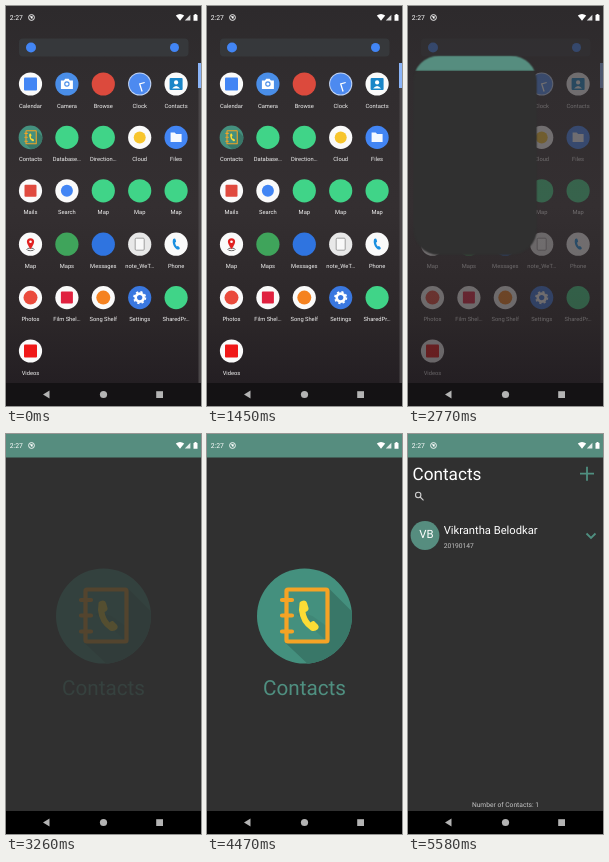
An HTML page for the animation above (6.46 s loop, 195 by 400 pixels).

```html
<!DOCTYPE html>
<html lang="en">
<head>
<meta charset="utf-8">
<title>Contacts app launch</title>
<style>
  html, body { margin: 0; width: 100%; height: 100%; overflow: hidden; background: #000; }
  #stage { position: relative; width: 195px; height: 400px; overflow: hidden; }
  #stage > div, #stage > svg, .layer > svg { position: absolute; left: 0; top: 0; width: 195px; height: 400px; }
  #home { background: linear-gradient(#2d2a2c, #312d2f 20%, #342f31 50%, #2c2729 78%, #241f23 94%); }
  #splash { transform-origin: 0 0; }
  text { font-family: Roboto, sans-serif; text-rendering: geometricPrecision; }
  .label { font-size: 5.75px; fill: #f2f2f2; text-anchor: middle; }
</style>
</head>
<body>
<div id="stage">
  <div id="home" class="layer">
    <svg viewBox="0 0 195 400">
      <rect y="377" width="195" height="23" fill="#141214"/>
      <g id="drawer">
        <rect x="13" y="32.5" width="169.500" height="18" rx="4" fill="#36383b"/>
        <circle cx="25" cy="41.5" r="5" fill="#4285f4"/>
        <circle cx="168.500" cy="41.5" r="4.500" fill="#4285f4"/>
        <rect x="192.500" y="57" width="2.500" height="320" fill="#4a4648"/>
        <rect x="192" y="57" width="3" height="25" fill="#8ab4f8"/>
      </g>
    </svg>
  </div>

  <div id="splash" class="layer">
    <svg viewBox="0 0 195 400">
      <rect width="195" height="400" fill="#303030"/>
      <rect width="195" height="23.5" fill="#568d7f"/>
      <rect y="377" width="195" height="23"/>
      <g id="brand">
        <use href="#book" x="97.5" y="182"/>
        <text x="97.5" y="260.5" font-size="20.7" text-anchor="middle" fill="#4f8f80">Contacts</text>
      </g>
    </svg>
  </div>

  <div id="list" class="layer">
    <svg viewBox="0 0 195 400">
      <rect width="195" height="400" fill="#303030"/>
      <rect width="195" height="23.5" fill="#568d7f"/>
      <rect y="377" width="195" height="23"/>
      <text x="4.5" y="46.3" font-size="17.2" fill="#fff">Contacts</text>
      <g fill="none" stroke="#4f8f80" stroke-width="1.8">
        <path d="M172 39.700h14M179 32.700v14"/>
        <path d="M178.500 99.500l4.500 4.500 4.500-4.500"/>
      </g>
      <g fill="none" stroke="#d0d0d0" stroke-width="1.1">
        <circle cx="10.200" cy="61" r="2.700"/>
        <path d="M12.200 63l3.300 3.300"/>
      </g>
      <circle cx="17" cy="101.500" r="14.400" fill="#568d7f"/>
      <text x="18.5" y="104.3" font-size="11.4" text-anchor="middle" fill="#fff">VB</text>
      <text x="35.7" y="99.6" font-size="11.2" fill="#fff">Vikrantha Belodkar</text>
      <text x="35.8" y="114.300" font-size="6.7" fill="#c4c4c4">20190147</text>
      <text x="97.5" y="373" font-size="6.7" text-anchor="middle" fill="#c4c4c4">Number of Contacts: 1</text>
    </svg>
  </div>

  <svg id="system" viewBox="0 0 195 400">
    <defs>
      <clipPath id="disc"><circle r="47.5"/></clipPath>
      <path id="handset" d="M-9-12Q-9.500-15-4.500-15.500Q-2-15.500-1.500-13L0-8Q.5-5.500-3-4Q-2 2 2 6.500Q3.500 4.500 5.500 5L9.500 9Q11 11 9.500 13Q6.500 16 2.500 14.500Q-8.500 7-9.500-6Z"/>
      <g id="book">
        <circle r="47.500" fill="#44907e"/>
        <path clip-path="url(#disc)" d="M24-28L64 12V60H16L-20 26L22 24Z" fill="#397768"/>
        <path clip-path="url(#disc)" d="M-4-4L-8-2L22 25V10L8 0Z" fill="#3d8070" opacity=".5"/>
        <g fill="none" stroke="#f5a325" stroke-width="4.200">
          <rect x="-18" y="-26.500" width="41" height="52" rx="1.500"/>
          <path d="M-22.500-16h10M-22.500-.5h10M-22.500 15.500h10" stroke-linecap="round"/>
        </g>
        <use href="#handset" x="4" fill="#fcdc35"/>
      </g>
    </defs>
    <g fill="#fff">
      <text x="3.700" y="13.7" font-size="6.8">2:27</text>
      <circle cx="25.500" cy="11.500" r="2.900" fill="none" stroke="#fff" stroke-width=".9"/>
      <path d="M24 10l3 .4-.8 2.600-1.200-.8z"/>
      <path d="M169.800 9.500Q174 6.300 178.200 9.500L174 14.800Z"/>
      <path d="M178.800 14.600h5.600V8.800z" opacity=".85"/>
      <path d="M187.500 9h1v-.9h2V9h1v5.700h-4z"/>
    </g>
    <g fill="#b4b4b4">
      <path d="M37 388.500l6.500-3.900v7.800z"/>
      <circle cx="97.500" cy="388.500" r="3.600"/>
      <rect x="150.200" y="385.200" width="6.800" height="6.800"/>
    </g>
  </svg>
</div>

<script>
const LOOP = 6460;
const $ = id => document.getElementById(id);

const dot = (color, r = 6) => `<circle r="${r}" fill="${color}"/>`;
const square = (color, s) => `<rect x="${-s / 2}" y="${-s / 2}" width="${s}" height="${s}" rx="1" fill="${color}"/>`;
const plate = color => dot(color, 11.6);
const onWhite = art => plate('#fafafa') + art;

const GREEN = plate('#40d488');
const BLUE = '#4285f4';

const camera = plate('#4a8ee8') +
  '<path d="M-6-3.500h3l1.300-1.700h3.400l1.300 1.700h3v8.500h-12z" fill="#fff"/>' +
  dot('#4a8ee8', 2.7) + dot('#fff', 1.6);
const clock = plate('#c3d6f6') + dot('#4d8af0', 10.6) +
  '<path d="M2.400 7.500L0 0L5-1.500" fill="none" stroke="#fff" stroke-width="1.300"/>';
const people = onWhite('<rect x="-6.500" y="-6" width="13" height="12" rx="1" fill="#1a86c8"/>' +
  '<circle cy="-1.600" r="2.100" fill="#fff"/><path d="M-4 4.500Q0-.5 4 4.500z" fill="#fff"/>');
const files = plate(BLUE) + '<path d="M-5.500-5h4l1.500 1.500h5.500v8h-11z" fill="#f4f8ff"/>';
const pin = onWhite('<ellipse cy="5.200" rx="3.600" ry="1.300" fill="none" stroke="#444" stroke-width=".8"/>' +
  '<path d="M0 5Q-3.600 0-3.600-2.400A3.600 3.600 0 0 1 3.600-2.400Q3.600 0 0 5z" fill="#e02020"/>' +
  '<circle cy="-2.400" r="1.300" fill="#fff"/>');
const note = plate('#e8e8e8') +
  '<rect x="-4.500" y="-6" width="9" height="12" rx="1" fill="#f8f8f8" stroke="#8c8c8c" stroke-width=".8"/>';
const phone = onWhite('<use href="#handset" transform="scale(.36)" fill="#1a8fe0"/>');
const gear = plate('#3a78e0') +
  '<circle r="4" fill="none" stroke="#fff" stroke-width="2.600"/>' +
  '<circle r="5.700" fill="none" stroke="#fff" stroke-width="1.700" stroke-dasharray="2.240"/>';
const book = '<use href="#book" transform="scale(.25)"/>';

const apps = [
  ['Calendar', onWhite(square(BLUE, 13))], ['Camera', camera], ['Browse', plate('#dc4a3d')],
  ['Clock', clock], ['Contacts', people],
  ['Contacts', book], ['Database…', GREEN], ['Direction…', GREEN],
  ['Cloud', onWhite(dot('#f7c52d'))], ['Files', files],
  ['Mails', onWhite(square('#e04a3f', 12))], ['Search', onWhite(dot(BLUE))],
  ['Map', GREEN], ['Map', GREEN], ['Map', GREEN],
  ['Map', pin], ['Maps', plate('#3fa45b')], ['Messages', plate('#2f74e0')],
  ['note_WeT…', note], ['Phone', phone],
  ['Photos', onWhite(dot('#ea4a3c', 7))], ['Film Shel…', onWhite(square('#e0213f', 12))],
  ['Song Shelf', onWhite(dot('#f58220', 7))], ['Settings', gear], ['SharedPr…', GREEN],
  ['Videos', onWhite(square('#f01818', 13))]
];

$('drawer').insertAdjacentHTML('beforeend', apps.map(([name, art], i) => {
  const x = 24.5 + (i % 5) * 36.4, y = 78 + Math.floor(i / 5) * 53.4;
  return `<g transform="translate(${x} ${y})">${art}<text class="label" y="23.500">${name}</text></g>`;
}).join(''));

// Each step: [time in ms, properties, easing to the next step]
function play(el, steps) {
  const first = steps[0], last = steps[steps.length - 1];
  const all = [[0, first[1]], ...steps, [LOOP, last[1]]];
  el.animate(all.map(([ms, props, easing = 'linear']) => ({ offset: ms / LOOP, easing, ...props })),
    { duration: LOOP, iterations: Infinity });
}

const STANDARD = 'cubic-bezier(.4, 0, .2, 1)';
const FAST_OUT = 'cubic-bezier(.1, .75, .1, 1)';

// The window grows out of the tapped icon
play($('splash'), [
  [2590, { transform: 'translate(12.5px, 119px) scale(.123)', clipPath: 'inset(0 0 205px 0 round 97px)' }, STANDARD],
  [3060, { transform: 'translate(0px, 0px) scale(1)', clipPath: 'inset(0 0 0px 0 round 0px)' }]
]);
play($('splash'), [[2590, { opacity: 0 }], [2690, { opacity: 1 }]]);
play($('drawer'), [[2600, { opacity: 1 }], [2850, { opacity: 0 }]]);
play($('brand'), [[3080, { opacity: 0 }], [4100, { opacity: 1 }]]);

// Screen change: the old one zooms slightly while the new one scales in
play($('splash').firstElementChild, [
  [5230, { transform: 'scale(1)' }, FAST_OUT], [5570, { transform: 'scale(1.05)' }]
]);
play($('list'), [
  [5230, { transform: 'scale(.85)' }, FAST_OUT], [5570, { transform: 'scale(1)' }]
]);
play($('list'), [[5250, { opacity: 0 }], [5330, { opacity: 1 }]]);
</script>
</body>
</html>
```
